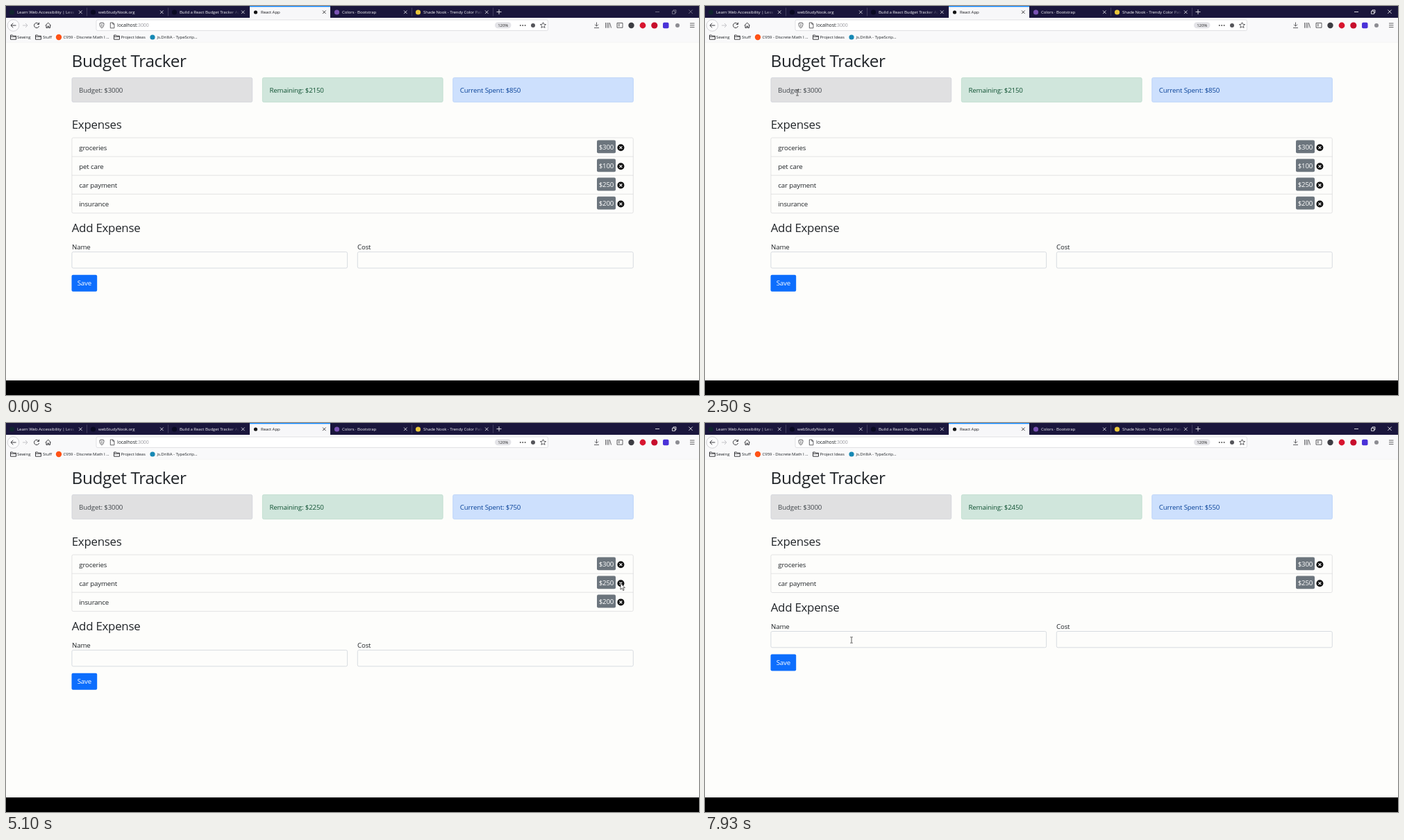
Write an HTML page that moves like this. It is 998x561 px and loops after 8 s.

```html
<!DOCTYPE html>
<html lang="en">
<head>
<meta charset="utf-8">
<title>Budget Tracker</title>
<style>
  html, body { margin: 0; width: 100%; height: 100%; overflow: hidden; background: #000; }
  svg { display: block; width: 100vw; height: 100vh; }
  text { font-family: "Open Sans", "Noto Sans", sans-serif; font-size: 9.7px; letter-spacing: -.016em; fill: #212529; }
  .ui { font-size: 6.1px; }
  .h1 { font-size: 24.4px; }
  .h3 { font-size: 16.9px; }
  .line { fill: none; stroke: #3a3a3e; stroke-width: 1; }
  .box { fill: #fdfdfb; stroke: #ced4da; stroke-width: .8; }
</style>
</head>
<body>
<svg id="stage" viewBox="0 0 998 561" preserveAspectRatio="none">
  <defs>
    <linearGradient id="fade">
      <stop offset="0" stop-color="#1a163c" stop-opacity="0"/>
      <stop offset="1" stop-color="#1a163c"/>
    </linearGradient>
  </defs>
  <rect width="998" height="540" fill="#fdfdfb"/>
  <rect width="998" height="17" fill="#1a163c"/>
  <rect x="351" width="116" height="17" fill="#f7f7f9"/>
  <rect x="351" width="116" height="1.3" fill="#0a84ff"/>
  <rect y="17" width="998" height="35" fill="#f9f9fa"/>
  <path d="M0 52.3H998" stroke="#eeeeef" stroke-width=".6"/>
  <g id="tabs"></g>
  <path id="controls" fill="none" stroke="#fff" stroke-width=".8"
    d="M935 8.5h6M983.3 5.5l5.4 5.4m0-5.4l-5.4 5.4M959.5 7.3h4v4h-4zM961 7.3V5.8h4v4h-1.5"/>
  <g class="line">
    <circle cx="10.5" cy="28" r="8.3" fill="#fcfcfd" stroke="#c2c2c6" stroke-width=".7"/>
    <path d="M14.5 28H7m3.2-3.3L7 28l3.2 3.3"/>
    <path d="M24 28h7m-3-3l3 3-3 3" stroke="#c4c4c8"/>
    <path d="M47 25.8a3.6 3.6 0 1 0 .6 3.2M47.6 23.8v2.7h-2.7"/>
    <path d="M56.6 28.2l4.1-4 4.1 4M58 27.5v4h2v-2.4h1.5v2.4h2v-4"/>
    <rect x="130" y="20" width="650.5" height="15.5" rx="2" fill="#fff" stroke="#d5d5d9" stroke-width=".7"/>
    <g stroke-width=".8">
      <path d="M138 23.9l3 1c0 4-1 5.7-3 6.9-2-1.2-3-2.9-3-6.9zM138 25.5v4.5"/>
      <path d="M150.3 24h3.6l2 2v5.8h-5.6zM153.8 24v2.2h2"/>
      <path d="M773.5 23.7l1.2 2.6 2.9.3-2.2 1.9.7 2.9-2.6-1.5-2.6 1.5.7-2.9-2.2-1.9 2.9-.3z"/>
      <path d="M850.5 23.5v5.5m-2.6-2.4l2.6 2.6 2.6-2.6M847 31.5h7"/>
      <path d="M863.5 24v7.7M865.8 24v7.7M868 24v7.7M869.5 24.3l2 7.2"/>
      <path d="M880 24.5h8v6.7h-8zM881.5 26.5h2.5M881.5 28.5h2.5"/>
      <path d="M985 25h6.5M985 27.8h6.5M985 30.6h6.5"/>
    </g>
    <rect x="704" y="23.3" width="23.5" height="9" rx="4.5" fill="#e4e4e8" stroke="none"/>
  </g>
  <g id="toolbar"></g>
  <g id="page"></g>
  <g id="form"></g>
  <rect y="540" width="998" height="21" fill="#000"/>
  <g id="cursor">
    <path id="arrow" d="M0 0V9.2L2.1 7.3L3.7 10.6L5.1 10L3.6 6.7H6.4Z" fill="#fff" stroke="#222" stroke-width=".7"/>
    <path id="beam" d="M-1.8-4.2H-.5L0-3.8L.5-4.2H1.8M0-3.8V3.8M-1.8 4.2H-.5L0 3.8L.5 4.2H1.8" fill="none" stroke="#333" stroke-width=".8"/>
  </g>
</svg>
<script>
const LOOP = 8000, ROW = 27.1, FOCUS = 1350;
const $ = id => document.getElementById(id);
const text = (x, y, s, cls = '', fill = '#212529', anchor = 'start') =>
  `<text x="${x}" y="${y}" class="${cls}" style="fill:${fill}" text-anchor="${anchor}">${s}</text>`;
const dot = (x, y, r, fill) => `<circle cx="${x}" cy="${y}" r="${r}" fill="${fill}"/>`;
const box = (x, y, w, h, attrs) => `<rect x="${x}" y="${y}" width="${w}" height="${h}" rx="2" ${attrs}/>`;

// left edge, title, icon colour
const tabs = [
  [0, 'Learn Web Accessibility | Less', '#10262f'],
  [117, 'webStudyNook.org', '#0a0a23'],
  [234, 'Build a React Budget Tracker Ap', '#0a0a23'],
  [351, 'React App', '#111'],
  [468, 'Colors · Bootstrap', '#7952b3'],
  [585, 'Shade Nook - Trendy Color Palet', '#e8c53a'],
];
$('tabs').innerHTML = tabs.map(([x, title, icon]) => {
  const active = x === 351, ink = active ? '#18181c' : '#f2f2f6';
  const fade = active ? '' : `<rect x="${x + 85}" y="2" width="17" height="14" fill="url(#fade)"/><rect x="${x + 102}" y="2" width="12" height="14" fill="#1a163c"/>`;
  return dot(x + 8.5, 9, active ? 2.6 : 3.6, icon) + text(x + 16, 11.2, title, 'ui', ink) + fade +
    `<path d="M${x + 105} 6.5l4.6 4.6m0-4.6l-4.6 4.6" stroke="${ink}" stroke-width=".8"/>` +
    (active || x === 234 ? '' : `<path d="M${x + 116.5} 2.5v12" stroke="#5c5a78" stroke-width=".6"/>`);
}).join('') + '<path d="M706.5 8.5h7m-3.5-3.5v7" stroke="#fff" stroke-width=".8"/>';

const folder = x => `<path d="M${x} 42h3l1 1.2h4v5h-8zM${x} 44.2h8" class="line" stroke-width=".8"/>`;
const bookmarks = [
  [16, 'Sewing'], [53, 'Stuff'], [82.5, 'C959 - Discrete Math I ...'],
  [165.5, 'Project Ideas'], [217.5, 'js.DrilliA - TypeScrip...'],
];
$('toolbar').innerHTML =
  `<text x="160" y="30.4" style="font-size:7px">localhost<tspan fill="#99999f">:3000</tspan></text>` +
  text(715.7, 30, '120%', 'ui', '#333', 'middle') +
  [740.8, 744.2, 747.6].map(x => dot(x, 28, .9, '#444')).join('') +
  dot(759, 28, 3, '#55555a') + dot(900.5, 28, 4.2, '#3c3c42') +
  dot(917, 28, 4.4, '#d8152f') + dot(933.8, 28, 4.6, '#c70d2c') +
  box(946, 23.7, 8.5, 8.5, 'fill="#4a32d8"') + dot(967, 28, 3, '#8c8c92') +
  [6.5, 42.5, 155.5].map(folder).join('') +
  dot(76, 45, 4.2, '#ff5216') + dot(211, 45, 3.6, '#1688b4') +
  bookmarks.map(([x, s]) => text(x, 47.4, s, 'ui')).join('');

const expenses = [['groceries', 300], ['pet care', 100], ['car payment', 250], ['insurance', 200]];
// moment each expense is deleted
const deletions = { 'pet care': 4600, insurance: 6200 };

const card = (x, label, fill, stroke, ink) =>
  box(x + .4, 103.4, 259.7, 35.2, `fill="${fill}" stroke="${stroke}" stroke-width=".8"`) +
  text(x + 10.5, 125.2, label, '', ink);

function row([name, cost], i) {
  const y = 190 + i * ROW;
  return (i ? `<path d="M95 ${y}H903.5" stroke="#dcdcdd" stroke-width=".8"/>` : '') +
    text(105.3, y + 17.5, name) +
    box(851, y + 3.4, 27, 18.8, 'fill="#6c757d"') + text(864.5, y + 16.8, '$' + cost, '', '#fff', 'middle') +
    dot(885.4, y + 14.2, 5, '#111') +
    `<path d="M883.5 ${y + 12.3}l3.8 3.8m0-3.8l-3.8 3.8" stroke="#fff" stroke-width="1.1"/>`;
}

$('form').innerHTML =
  text(94.7, 326.3, 'Add Expense', 'h3') + text(95, 351, 'Name') + text(506, 351, 'Cost') +
  box(94.9, 354.7, 396.7, 23.3, 'class="box"') + box(506.3, 354.7, 397, 23.3, 'class="box"') +
  box(94.5, 387.8, 36.7, 24, 'fill="#0d6efd"') + text(112.9, 403.3, 'Save', '', '#fff', 'middle');

let shownCount = -1;
function drawPage(list) {
  if (list.length === shownCount) return;
  shownCount = list.length;
  const spent = list.reduce((sum, [, cost]) => sum + cost, 0);
  $('page').innerHTML =
    text(94.5, 88.2, 'Budget Tracker', 'h1') +
    card(94.6, 'Budget: $3000', '#e0e0e1', '#d0d2da', '#41464b') +
    card(369, `Remaining: $${3000 - spent}`, '#d0e6dc', '#badbcc', '#0f5132') +
    card(643.3, `Current Spent: $${spent}`, '#cde0fd', '#b6d0f8', '#084298') +
    text(94.7, 176.7, 'Expenses', 'h3') +
    box(94.9, 190, 808.4, ROW * list.length + .3, 'fill="#fdfdfb" stroke="#dcdcdd" stroke-width=".8"') +
    list.map(row).join('');
  $('form').setAttribute('transform', `translate(0 ${(list.length - expenses.length) * ROW})`);
}

// stops of the pointer: time, x, y
const path = [
  [1150, -8, 200], [1700, 80, 150], [2300, 133, 125], [2600, 133, 125], [3150, 410, 124],
  [3700, 690, 124], [4130, 879, 229], [4300, 885, 231], [5180, 885, 231], [5600, 885, 258],
  [6350, 885, 258], [6850, 741, 223.5], [7020, 741, 223.5], [7700, 211, 313], [LOOP, 211, 313],
];
// text areas that turn the pointer into a beam: left, top, right, bottom
const beamAreas = [
  [105, 115, 169, 130], [380, 115, 458, 130], [654, 115, 742, 130],
  [851, 193, 880, 239], [95, 300, 491, 324],
];

function drawCursor(t) {
  const i = path.findIndex(stop => stop[0] > t) - 1;
  $('cursor').style.display = i < 0 ? 'none' : '';
  if (i < 0) return;
  const [t0, x0, y0] = path[i], [t1, x1, y1] = path[i + 1];
  const p = (t - t0) / (t1 - t0), k = p * p * (3 - 2 * p);
  const x = x0 + (x1 - x0) * k, y = y0 + (y1 - y0) * k;
  const beam = beamAreas.some(([l, top, r, b]) => x > l && x < r && y > top && y < b);
  $('cursor').setAttribute('transform', `translate(${x} ${y})`);
  $('beam').style.display = beam ? '' : 'none';
  $('arrow').style.display = beam ? 'none' : '';
}

function draw(t) {
  drawPage(expenses.filter(([name]) => !(t >= deletions[name])));
  drawCursor(t);
  $('controls').setAttribute('opacity', t < FOCUS ? .45 : 1);
}

const start = performance.now();
function tick() {
  draw((performance.now() - start) % LOOP);
  requestAnimationFrame(tick);
}
tick();
</script>
</body>
</html>
```
